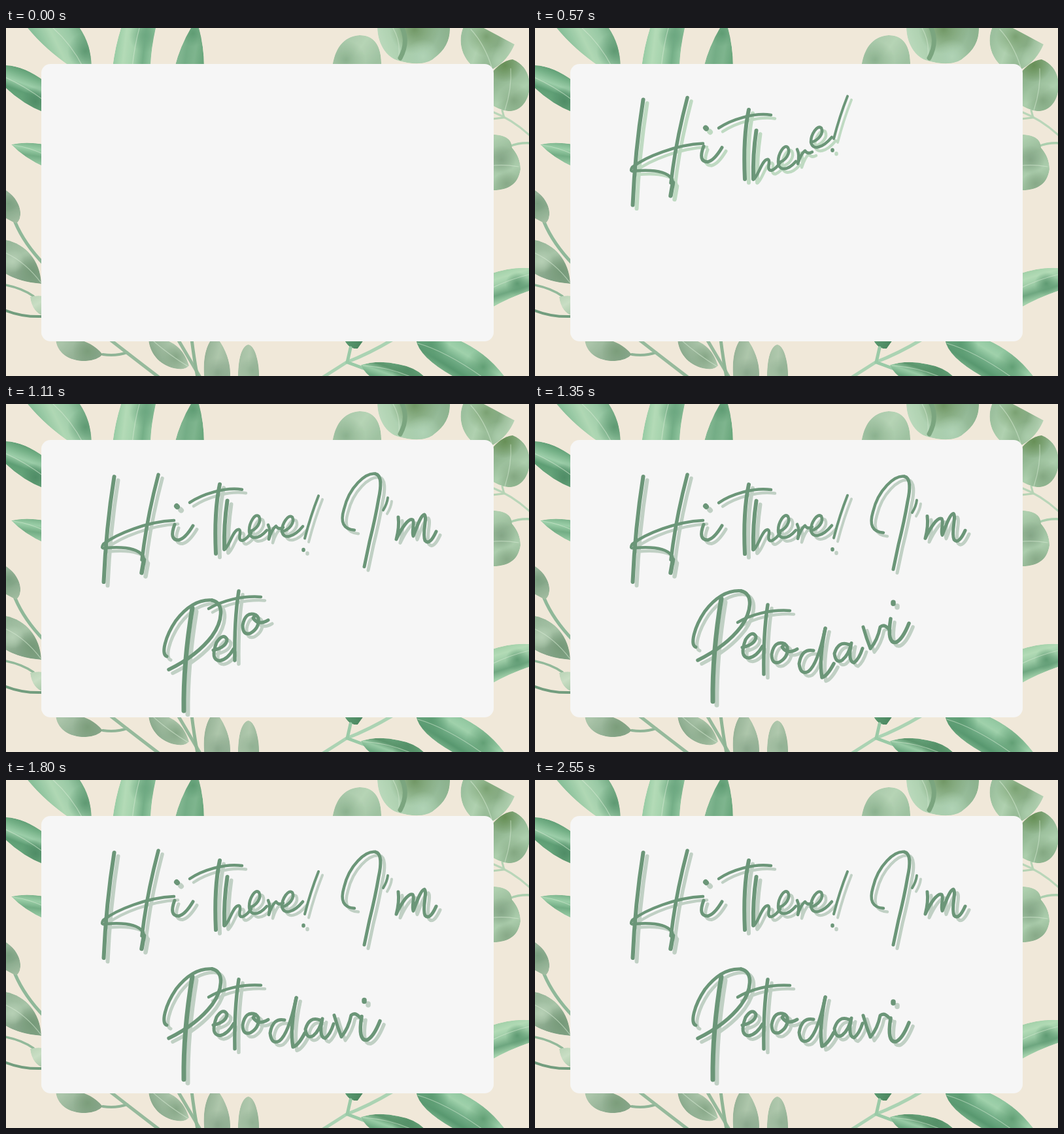
Write an HTML page with a canvas that moves like this. It is 800x532 px and loops after 4.53 s.

```html
<!DOCTYPE html>
<html lang="en">
<head>
<meta charset="utf-8">
<title>Greeting card</title>
<style>
html, body { margin: 0; width: 100%; height: 100%; overflow: hidden; background: #f0e8d9; }
canvas { display: block; width: 100vw; height: 100vh; }
</style>
</head>
<body>
<canvas id="stage" width="800" height="532" role="img" aria-label="Hi There! I'm Petodavi"></canvas>
<script>
const LOOP = 4530, STEP = 30, START = 60, STAGGER = 60;
const TEXT = "Hi There! I'm Petodavi";
const INK = '#6b9678';
const canvas = document.getElementById('stage');
const ctx = canvas.getContext('2d');

const back = document.createElement('canvas');
back.width = 800;
back.height = 532;
const g = back.getContext('2d');

// Wash of colours along an axis, with soft pools of pigment inside the outline
function leaf(d, axis, colors, pools = [], vein = '') {
  const path = new Path2D(d);
  const wash = g.createLinearGradient(...axis);
  colors.forEach((c, i) => wash.addColorStop(i / (colors.length - 1), c));
  g.save();
  g.clip(path);
  g.fillStyle = wash;
  g.fill(path);
  for (const [x, y, r, c] of pools) {
    const pool = g.createRadialGradient(x, y, 0, x, y, r);
    pool.addColorStop(0, c);
    pool.addColorStop(1, c + '00');
    g.fillStyle = pool;
    g.fillRect(x - r, y - r, 2 * r, 2 * r);
  }
  g.fillStyle = 'rgba(232, 238, 222, 0.1)';
  g.fill(path);
  if (vein) stem(vein, 1.2, 'rgba(215, 234, 212, 0.55)');
  g.restore();
}

function stem(d, width, color) {
  g.lineCap = 'round';
  g.lineWidth = width;
  g.strokeStyle = color;
  g.stroke(new Path2D(d));
}

function topLeft() {
  leaf('M33 0Q60 33 100 60H131Q130 25 113 0Z', [58, 40, 125, 8],
    ['#7fba92', '#a9d4af', '#8fc39d', '#5a996f'], [[122, 35, 28, '#4f8f66']], 'M72 0Q100 25 118 60');
  leaf('M176 0Q167 28 163 60H221Q222 30 229 0Z', [167, 25, 226, 32],
    ['#8cc59b', '#add8b2', '#9ccda5', '#66a67c', '#8cc49b'], [[213, 12, 25, '#5f9f76']], 'M204 0Q197 25 193 60');
  leaf('M283 0Q266 28 258 60H303Q303 28 295 0Z', [264, 30, 303, 36],
    ['#79b18a', '#67a57c', '#72ad84', '#5a9d70'], [[286, 8, 20, '#4f9267']]);
  leaf('M0 57Q28 58 60 82V130Q25 116 0 92Z', [35, 62, 18, 108],
    ['#478d61', '#69aa7e', '#93c9a2', '#4e9468', '#589c70'], [[45, 112, 22, '#3e8058']], 'M0 76Q28 88 60 112');
  leaf('M8 178Q30 173 60 178V213Q28 199 8 178Z', [34, 174, 30, 204],
    ['#6caa80', '#92caa1', '#65a57a', '#88c098'], [], 'M10 179Q35 182 60 194');
}

function left() {
  stem('M14 297Q28 330 58 361', 5, '#8fb899');
  leaf('M0 248C14 257 23 272 22 286Q21 296 15 299L0 291Z', [0, 252, 20, 296],
    ['#8fae92', '#7b9f80', '#9ab79a'], [[4, 268, 14, '#6e9675']]);
  leaf('M0 324C30 330 52 355 54 391Q20 388 0 376Z', [12, 326, 42, 390],
    ['#8fb092', '#9fbea0', '#7e9f82', '#73987a'], [[40, 372, 26, '#688f6c'], [10, 356, 18, '#b0cbb0']], 'M0 344Q30 358 54 390');
  stem('M0 393Q25 398 42 410', 3.5, '#92b99a');
  leaf('M37 411Q46 408 60 410V441Q40 436 37 411Z', [38, 410, 54, 436], ['#b4d0b2', '#c5dbc0', '#a9c8a9']);
  stem('M0 432Q25 442 56 441', 4, '#729d7e');
}

function bottom() {
  stem('M148 499Q168 502 185 496', 4, '#8fb496');
  stem('M160 477Q205 512 234 534', 5, '#96ba9c');
  leaf('M76 476C78 498 98 510 122 509Q140 508 148 499C135 484 122 479 110 476Z', [90, 476, 125, 510],
    ['#a3bfa3', '#8dac8f', '#7d9f82'], [[125, 494, 24, '#6f936f']]);
  stem('M263 476Q280 505 297 534', 5, '#96b99b');
  stem('M284 476Q288 508 293 534', 5, '#8fb595');
  leaf('M218 476C220 500 238 518 262 521Q275 523 280 516C274 496 260 480 240 476Z', [225, 505, 260, 485],
    ['#7b9f80', '#94b295', '#a8c3a7'], [[260, 503, 22, '#7a9d7c']], 'M226 479Q250 500 278 517');
  leaf('M304 540C300 510 305 488 314 476H325C338 494 346 518 342 540Z', [304, 500, 343, 510],
    ['#8cab8e', '#a7c1a5', '#90ae92'], [[324, 528, 24, '#7f9f83']]);
  leaf('M355 540C354 505 361 485 371 484C381 486 388 510 387 540Z', [355, 510, 388, 512],
    ['#9bb89b', '#a9c3a7', '#8cac8f'], [[377, 524, 22, '#87a98a']]);
  leaf('M517 476Q525 492 538 490L548 476Z', [520, 480, 542, 488], ['#498e62', '#397a51']);
  stem('M480 537L521 511Q555 498 592 476', 5, '#abd3b3');
  stem('M527 489L522 511L549 521', 5, '#9acaa7');
  leaf('M543 515Q570 507 600 514Q632 520 646 540H570Q550 532 543 515Z', [585, 508, 575, 536],
    ['#579a6f', '#4b8a5f', '#8fc69e', '#60a177'], [[615, 523, 24, '#438459']], 'M546 516Q590 519 625 536');
  leaf('M627 476Q632 505 690 536H765Q735 495 690 476Z', [703, 482, 672, 532],
    ['#86c198', '#97cda5', '#65a67d', '#478d62', '#78b38a'],
    [[650, 484, 28, '#4b9165'], [730, 518, 28, '#529568']], 'M630 482Q675 495 732 536');
}

function right() {
  leaf('M740 376Q772 365 800 367V402Q770 412 740 429Z', [768, 366, 782, 412],
    ['#97caa0', '#acd8b1', '#91c59d', '#5f9d74', '#9bcda5'], [[782, 391, 18, '#4f9066']], 'M740 399Q770 384 800 377');
  stem('M744 128Q775 140 802 165', 3, '#b9d6b9');
  stem('M759 126L762 137L744 139', 3, '#b5d3b4');
  stem('M770 181Q785 175 802 176', 3.5, '#abcfae');
  leaf('M740 163C760 162 774 168 774 183C782 192 787 203 787 216C784 236 772 246 750 248H740Z', [748, 168, 782, 240],
    ['#a8cba9', '#8fb491', '#a4c8a6', '#87ad89'], [[758, 201, 22, '#789c7c'], [766, 238, 20, '#7da17e']], 'M740 211Q760 208 784 212');
}

function topRight() {
  leaf('M499 60C503 32 515 13 541 11C562 11 575 25 574 60Z', [510, 20, 562, 58],
    ['#9fc2a2', '#b0d0b0', '#96bc9a'], [[520, 49, 30, '#80a985']]);
  leaf('M568 -2C568 22 580 44 600 50C625 57 645 55 655 46C672 34 680 18 679 -2Z', [580, 45, 675, 10],
    ['#b5d6b7', '#a0c8a5', '#93bb98', '#82ab86'],
    [[625, 2, 38, '#648d58'], [638, 44, 27, '#a9cfb0']], 'M592 0Q605 22 600 50');
  stem('M606 0Q616 22 603 46', 7, '#7ba57f');
  leaf('M700 -2C692 15 694 40 712 57C722 66 735 66 746 62C760 54 772 40 778 25L725 -3Z', [698, 20, 771, 46],
    ['#93ba96', '#a9cdaa', '#81a981', '#b1d0b1'], [[735, 13, 30, '#6e9866'], [755, 50, 24, '#a3c8a5']], 'M711 2Q732 25 743 60');
  leaf('M740 72Q757 50 775 48C795 56 804 75 800 98C796 118 782 128 768 127Q752 125 740 115Z', [750, 58, 790, 120],
    ['#769d70', '#89b18a', '#a5caa7', '#8cb58f'], [[763, 57, 26, '#588447'], [777, 111, 26, '#789f77']], 'M772 62Q774 92 763 126');
}

function paintBack() {
  g.fillStyle = '#f0e8d9';
  g.fillRect(0, 0, 800, 532);
  topLeft();
  left();
  bottom();
  right();
  topRight();
  g.fillStyle = '#f6f6f6';
  g.beginPath();
  g.roundRect(54, 55, 692, 424, 14);
  g.fill();
}

// Each glyph is a run of [width, path] pen strokes, in reading order
const glyphs = [];
const glyph = (...strokes) => glyphs.push(strokes.map(([w, d]) => [w, new Path2D(d)]));

glyph([6, 'M165.5 111Q153 190 149.5 272'], [5.5, 'M233 108Q218 165 211 215L208 238'],
  [4.5, 'M257 178C215 180 170 198 149 214Q144 222 152 220C185 217 213 222 211 242'], [6.5, 'M211 238L207.5 258']);
glyph([5, 'M258 184Q249 208 264 208Q274 206 286 186'], [8, 'M261 156L262 157']);
glyph([6, 'M327 123Q318 165 321 229'], [4.5, 'M281 151C300 138 335 127 361 131']);
glyph([6, 'M338.5 148Q333 185 334 222'], [4.5, 'M334 223C342 218 347 192 356 192C362 194 352 210 362 209Q369 206 375 197']);
glyph([4.5, 'M372 195C384 192 391 180 387 172C381 165 372 182 372 193C372 208 386 208 399 193']);
glyph([4.5, 'M401 184Q405 192 402 206Q407 190 413 186Q417 192 424 188']);
glyph([4.5, 'M422 194C434 191 442 180 438 172C432 166 422 182 422 193C424 207 440 203 454 186']);
glyph([4, 'M478 140Q466 170 457 205'], [5.5, 'M455 222L455 223']);
glyph([4.5, 'M533 196C516 195 511 184 517 164C525 130 550 108 565 110'],
  [5, 'M565 110C575 112 574 130 570 148Q565 178 556 214L548 252']);
glyph([4, 'M584 146Q583 155 577 165']);
glyph([5, 'M600 171Q602 186 597 205C604 190 615 172 622 175C626 180 620 192 623 200C627 190 634 168 640 167C645 172 636 195 641 207Q648 215 658 193']);
glyph([7, 'M285 301Q271 385 272 458'],
  [5, 'M246 375C237 372 243 345 260 320C280 294 300 288 315 289'], [5.5, 'M315 289C335 293 331 322 315 344Q292 374 249 395']);
glyph([5, 'M317 375Q338 370 338 358Q332 348 322 363Q312 390 327 391Q339 389 348 373']);
glyph([5.5, 'M356 305Q349 350 350 411'], [4.5, 'M310 332C330 320 360 312 390 314']);
glyph([5, 'M382 358Q366 352 362 374Q362 390 374 386Q388 378 386 363Q383 355 378 363Q386 375 401 366']);
glyph([5, 'M426 366Q408 362 404 386Q406 404 418 398Q432 388 444 332'], [5.5, 'M444 332Q434 380 439 407Q447 405 457 386']);
glyph([5, 'M480 366Q464 360 458 380Q460 396 470 390Q480 382 484 364Q478 392 488 394Q496 388 501 372']);
glyph([5, 'M502 360Q507 378 513 393Q524 380 528 360Q534 355 541 363']);
glyph([5.5, 'M544 364Q538 402 552 400Q562 396 572 371'], [7.5, 'M548 339L548 341']);

const slots = [...TEXT].map((c, i) => c === ' ' ? -1 : i).filter(i => i >= 0);

// Damped drop: falls from above, overshoots and settles
const drop = age => -43 * Math.exp(-0.0057 * age) * Math.cos(Math.PI * (age - 42) / 205);

function write(t, dx, dy, color) {
  ctx.strokeStyle = color;
  glyphs.forEach((strokes, i) => {
    const age = t - START - slots[i] * STAGGER;
    if (age <= 0) return;
    ctx.save();
    ctx.translate(dx, dy + drop(age));
    for (const [w, path] of strokes) {
      ctx.lineWidth = w;
      ctx.stroke(path);
    }
    ctx.restore();
  });
}

function draw(t) {
  ctx.drawImage(back, 0, 0);
  write(t, 6, 5.5, t < 630 ? '#bfdac2' : '#c0d0c4');
  write(t, 0, 0, INK);
}

function frame() {
  const t = performance.now() % LOOP;
  draw(Math.floor(t / STEP) * STEP);
  requestAnimationFrame(frame);
}

paintBack();
ctx.lineCap = ctx.lineJoin = 'round';
frame();
</script>
</body>
</html>
```
